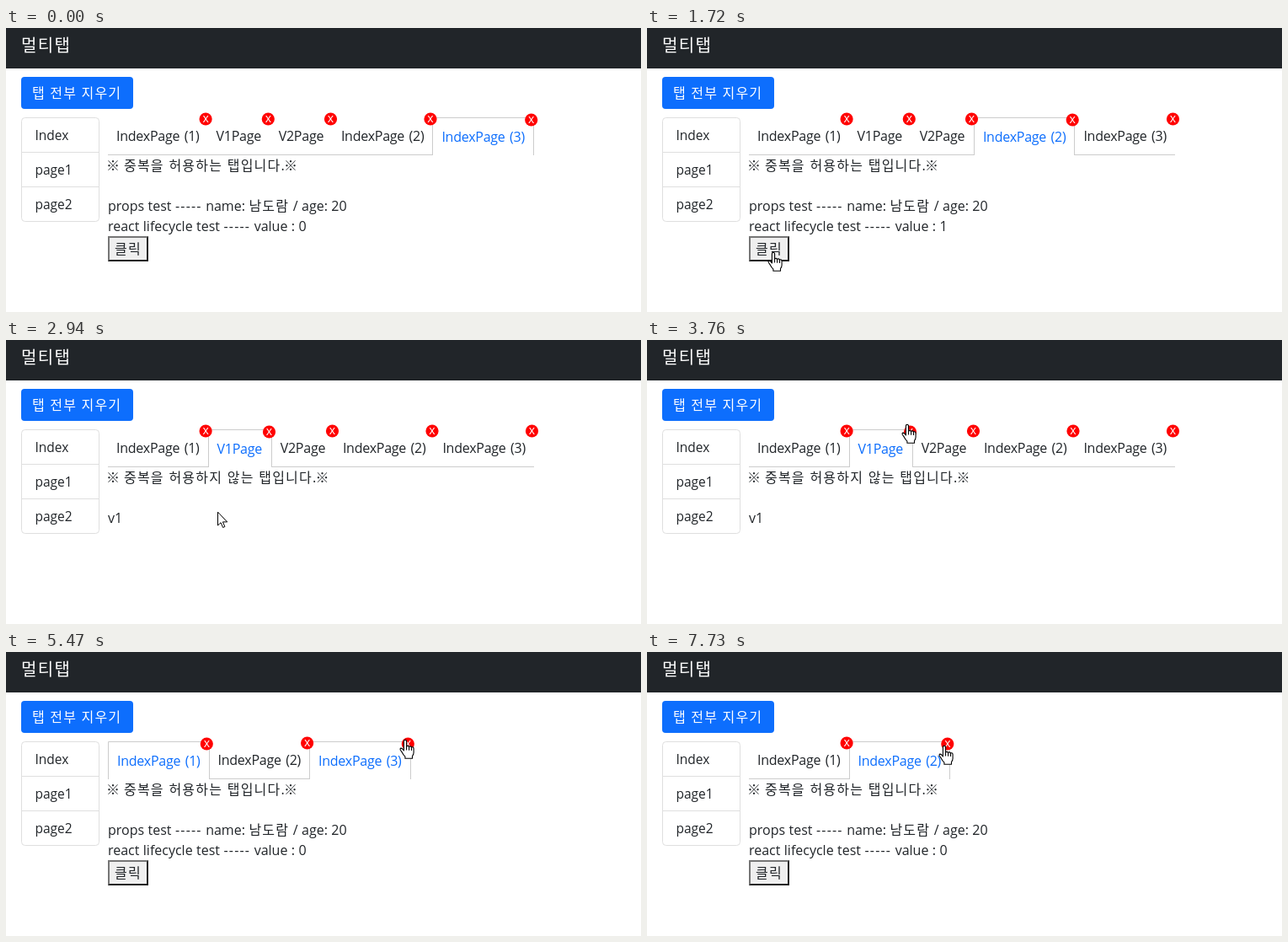
Animation, 754 px wide and 337 px high, one loop 8000 ms. Source, as an HTML page:

```html
<!DOCTYPE html>
<html lang="ko">
<head>
<meta charset="utf-8">
<title>멀티탭</title>
<style>
  html, body { margin: 0; width: 100%; height: 100%; overflow: hidden; background: #fff; }
  svg { display: block; }
  text { font: 16px "Open Sans", "Noto Sans CJK KR", "Noto Sans CJK", sans-serif; fill: #212529; white-space: pre; }
  .ko { letter-spacing: 1.2px; }
  .body { word-spacing: .3px; }
  .dash { letter-spacing: 1.2px; }
  .mark { letter-spacing: 0; }
  .brand { font-size: 20px; letter-spacing: 1.4px; fill: #fff; }
  .light { fill: #fff; }
  .item { font-size: 15.5px; }
  .tab { letter-spacing: -.25px; word-spacing: 1.6px; }
  .on { fill: #0d6efd; }
  .x { font-size: 14px; fill: #fff; text-anchor: middle; }
  .line { fill: none; stroke: #ccc; }
  .side { fill: none; stroke: #dfdfdf; }
</style>
</head>
<body>
<svg width="754" height="337" viewBox="0 0 754 337">
  <rect width="754" height="48" fill="#212529"/>
  <text class="brand" x="18" y="28">멀티탭</text>
  <rect x="18" y="58" width="133" height="38" rx="4" fill="#0d6efd"/>
  <text class="ko light" x="31" y="83">탭 전부 지우기</text>
  <rect class="side" x="18.5" y="106.5" width="92" height="123" rx="4"/>
  <path class="side" d="M18 147.5h93M18 188.5h93"/>
  <g id="menu"></g>
  <g id="panel"></g>
  <g id="tabs"></g>
  <g id="cursor" stroke-linejoin="round" stroke-linecap="round">
    <path id="arrow" fill="#fff" stroke="#000" d="M.5 .5V16l3.6-3.3 2.5 5.8 2.3-1-2.5-5.6h4.9z"/>
    <path id="hand" fill="#fff" stroke="#000" stroke-width="1.1"
      d="M-1.6 13V2a1.6 1.6 0 0 1 3.2 0v6q1.4-1.5 3 .4q1.6-1.2 2.9.5q2.4-.8 2.6 1.7v4.6q0 2.3-1.6 4.3v2.7h-8.6v-2.1q-2-1.9-3.4-4.7l-2.2-3.2q-.7-1.8.8-2.1q1.5-.1 3.3 2.9zM1.6 8v4M4.6 8.6v3.6M7.5 9.4v3"/>
    <path id="beam" fill="none" stroke="#222" d="M-3-9.5h2.2L0-8.7l.8-.8H3M0-8.7V8.7M-3 9.5h2.2L0 8.7l.8.8H3"/>
  </g>
</svg>
<script>
const LOOP = 8000, CLICK_GAP = 135, APPEAR = 70;
const LEFT = 121, INDEX_W = 118.5, PAGE_W = 74.2;
const NAMES = ['IndexPage (1)', 'V1Page', 'V2Page', 'IndexPage (2)', 'IndexPage (3)'];
const $ = id => document.getElementById(id);

// Pointer script: arrive at a place, rest there, act on leaving
const STOPS = [
  { x: 690, y: 317, at: APPEAR },
  { x: 440, y: 128, at: 560, go: 770, open: 3 },
  { x: 150, y: 266, at: 1520, go: 1860, clicks: 3 },
  { x: 309, y: 136, at: 2600, go: 2670, open: 1 },
  { x: 250, y: 205, at: 3040 },
  { x: 309, y: 100, at: 3760, go: 4080 },
  { x: 312, y: 100, at: 4090, go: 4230, close: 1 },
  { x: 317, y: 89, at: 4480 },
  { x: 312, y: 107, at: 4770, go: 4910, close: 2 },
  { x: 474, y: 104, at: 5470, go: 5730, close: 4 },
  { x: 186, y: 130, at: 6150 },
  { x: 351, y: 231, at: 6530, go: 6660 },
  { x: 325, y: 127, at: 7330, go: 7400, open: 3 },
  { x: 353, y: 111, at: 7730, go: LOOP }
].map(s => ({ go: s.at, ...s }));

const easeOut = u => 1 - (1 - u) ** 3.2;
const clamp = (v, lo, hi) => Math.min(hi, Math.max(lo, v));

function pointer(t) {
  const i = Math.max(1, STOPS.findIndex(s => t < s.go));
  const a = STOPS[i - 1], b = STOPS[i];
  const e = easeOut(clamp((t - a.go) / (b.at - a.go), 0, 1));
  return [a.x + (b.x - a.x) * e, a.y + (b.y - a.y) * e];
}

// Opening a tab resets its counter; closing the open one falls back to the first
function stateAt(t) {
  const closed = new Set();
  let active = 4, value = 0;
  const show = i => { active = i; value = 0; };
  for (const s of STOPS) {
    if (s.clicks) value += clamp(Math.floor((t - s.go) / CLICK_GAP) + s.clicks, 0, s.clicks);
    if (t < s.go) break;
    if (s.open !== undefined) show(s.open);
    if (s.close !== undefined) {
      closed.add(s.close);
      if (active === s.close) show(0);
    }
  }
  return { active, value, closed };
}

function layout(closed, lit) {
  let right = LEFT;
  return NAMES.flatMap((name, i) => {
    if (closed.has(i)) return [];
    const on = lit.includes(i), left = right;
    right += (name[0] === 'V' ? PAGE_W : INDEX_W) + (on ? 2 : 0);
    return [{ i, name, on, left, right, cx: right - (on ? 3.2 : 2.4), cy: on ? 109 : 108 }];
  });
}

function drawTab(b) {
  const l = Math.round(b.left), r = Math.round(b.right), d = b.on ? 1 : 0;
  const edge = b.on ? `M${l + .5} 151V106.5H${r - .5}V151` : `M${l} 150.5H${r}`;
  return `<path class="line" d="${edge}"/>
    <text class="tab ${b.on ? 'on' : ''}" x="${b.left + 10 + d}" y="${134 + d}">${b.name}</text>`;
}

const drawBadge = b => `<circle cx="${b.cx}" cy="${b.cy}" r="7.6" fill="#f00"/>
  <text class="x" x="${b.cx}" y="${b.cy + 3.8}">x</text>`;

const span = (cls, s, pos = '') => `<tspan class="${cls}" ${pos}>${s}</tspan>`;
const line = (y, s) => `<text class="body" x="${LEFT}" y="${y}">${s}</text>`;
const note = s => line(169, span('mark', '※', 'x="119"') + span('ko', s, 'x="140"') + span('mark', '※', 'dx="-2"'));
const dashes = span('dash', '-----');

function drawPanel(plain, value) {
  if (plain) return note('중복을 허용하지 않는 탭입니다.') + line(217, 'v1');
  return note('중복을 허용하는 탭입니다.') +
    line(217, `props test ${dashes} name: ${span('ko', '남도람')} / age: 20`) +
    line(241, `react lifecycle test ${dashes} value : ${value}`) +
    `<rect x="121" y="247" width="48" height="30" fill="#212121"/>
    <path d="M121 277V247H169L167 249V275H123z" fill="#767676"/>
    <rect x="123" y="249" width="44" height="26" fill="#efefef"/>
    <text class="ko" x="129" y="268">클릭</text>`;
}

function cursorKind(x, y, tabs, plain) {
  const inside = (top, h, end) => x > LEFT && x < end && y > top && y < top + h;
  if (tabs.some(b => Math.hypot(x - b.cx, y - b.cy) < 10.5)) return 'hand';
  if (!plain && inside(247, 30, 169)) return 'hand';
  const text = plain
    ? inside(153, 19, 382) || inside(201, 19, 137)
    : inside(153, 19, 344) || inside(201, 19, 407) || inside(225, 19, 356);
  return text ? 'beam' : 'arrow';
}

const drawn = {};
function update(id, html) {
  if (drawn[id] !== html) $(id).innerHTML = drawn[id] = html;
}

function render(t) {
  const { active, value, closed } = stateAt(t);
  const [x, y] = pointer(t), shown = t >= APPEAR, plain = active === 1;
  const over = shown && y > 100 && y < 150
    && layout(closed, [active]).find(b => x >= b.left && x < b.right);
  const tabs = layout(closed, over ? [active, over.i] : [active]);

  update('tabs', tabs.map(drawTab).join('') + tabs.map(drawBadge).join(''));
  update('panel', drawPanel(plain, value));

  const kind = cursorKind(x, y, tabs, plain);
  for (const id of ['arrow', 'hand', 'beam'])
    $(id).style.display = shown && id === kind ? '' : 'none';
  $('cursor').setAttribute('transform', `translate(${Math.round(x)} ${Math.round(y)})`);
}

update('menu', ['Index', 'page1', 'page2']
  .map((s, i) => `<text class="item" x="34.5" y="${133 + 41 * i}">${s}</text>`).join(''));

const start = performance.now();
function tick() {
  render((performance.now() - start) % LOOP);
  requestAnimationFrame(tick);
}
tick();
</script>
</body>
</html>
```
